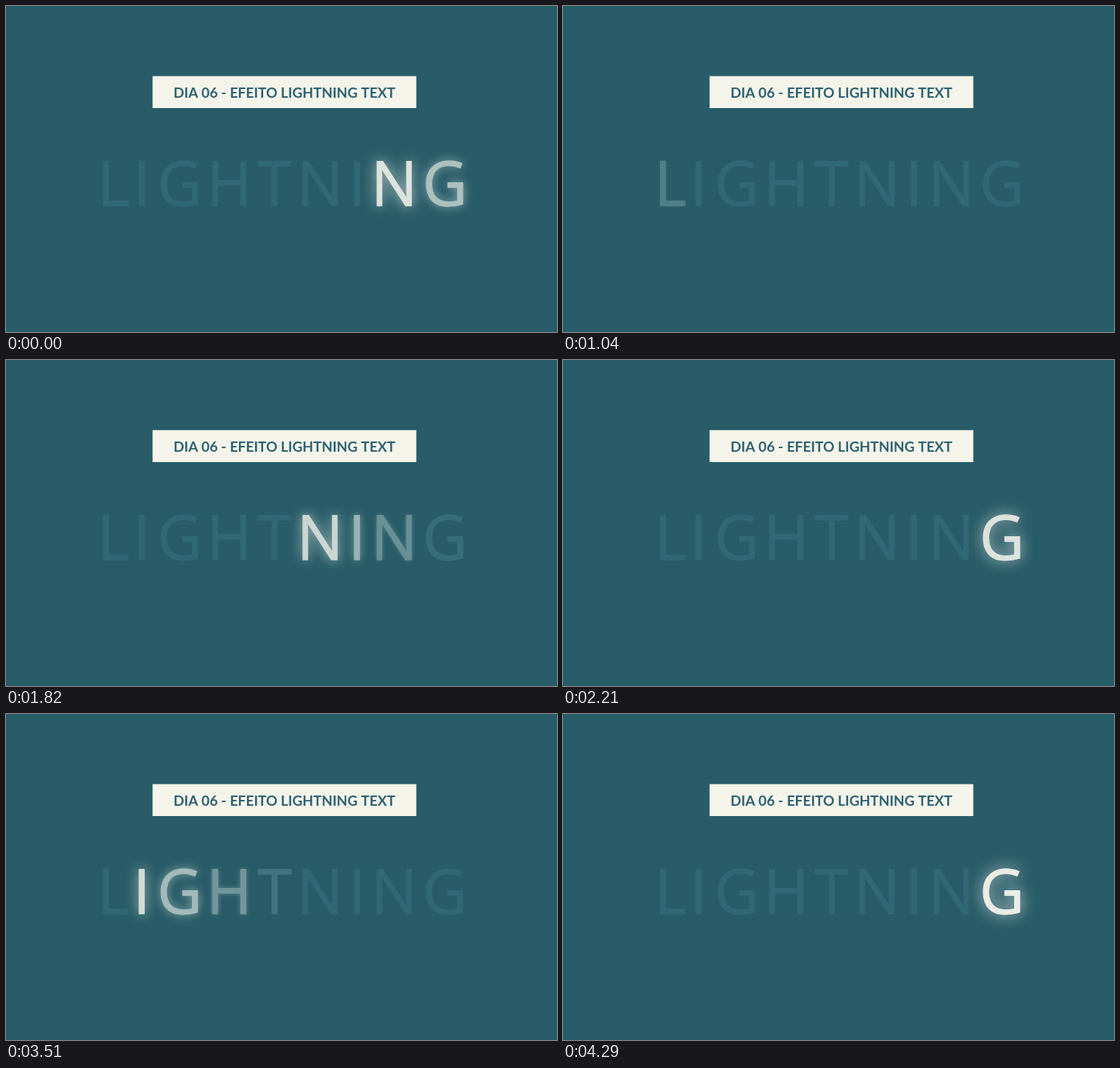
Recreate the animation shown at these times as an HTML page with a canvas. Size 750 by 444 pixels, loop 4420 ms.

```html
<!DOCTYPE html>
<html lang="pt">
<head>
<meta charset="utf-8">
<title>Lightning text</title>
<style>
html, body { margin: 0; width: 100%; height: 100%; overflow: hidden; background: #285c68; }
canvas { display: block; }
</style>
</head>
<body>
<canvas id="stage" width="750" height="444"></canvas>
<script>
const ctx = document.getElementById('stage').getContext('2d');
const LOOP = 4420, STEP = 130;
const CYCLE = 20; // letters' worth of travel between two sweeps
const FADE = 4;   // a letter lights up over this many letters of travel
const DIM = [48, 104, 117], LIT = [244, 244, 235];
const BACK = '#285c68', PAPER = '#f4f4ea', INK = '#2d6170';

const word = 'LIGHTNING';
const centers = [149.5, 185, 236, 304, 365.5, 427.5, 478, 528.5, 597];

// [time in ms, position of the sweep in letters]
const sweep = [[0, 6.5], [1040, 16.65], [1560, 21.9], [2210, 27.5], [3770, 42.9], [4290, 47.8]];

function sweepAt(t) {
  let k = 1;
  while (k < sweep.length - 1 && t > sweep[k][0]) k++;
  const [t0, s0] = sweep[k - 1], [t1, s1] = sweep[k];
  return s0 + (s1 - s0) * (t - t0) / (t1 - t0);
}

// Rises linearly to 1, then drops at once.
function glow(i, s) {
  const ahead = ((i - s) % CYCLE + CYCLE) % CYCLE;
  return Math.max(0, 1 - ahead / FADE);
}

function mix(v) {
  return `rgb(${DIM.map((c, k) => Math.round(c + (LIT[k] - c) * v))})`;
}

function drawTitle() {
  ctx.fillStyle = PAPER;
  ctx.fillRect(199.5, 95.5, 359, 43.5);
  ctx.fillStyle = INK;
  ctx.font = 'bold 19.1px Lato, sans-serif';
  ctx.textAlign = 'center';
  ctx.fillText('DIA 06 - EFEITO LIGHTNING TEXT', 379, 125);
}

function drawLetter(ch, center, v) {
  const m = ctx.measureText(ch);
  const x = center - (m.actualBoundingBoxRight - m.actualBoundingBoxLeft) / 2;
  ctx.fillStyle = ctx.strokeStyle = mix(v);
  ctx.shadowColor = `rgba(${LIT}, ${v})`;
  ctx.shadowBlur = 22 * v;
  ctx.fillText(ch, x, 271.5);
  // A thin round outline softens the corners.
  ctx.shadowColor = 'transparent';
  ctx.strokeText(ch, x, 271.5);
}

function draw(t) {
  ctx.fillStyle = BACK;
  ctx.fillRect(0, 0, 750, 444);
  drawTitle();

  const s = sweepAt(t);
  ctx.save();
  ctx.font = '83.5px "Open Sans", "Noto Sans", sans-serif';
  ctx.textAlign = 'left';
  ctx.lineWidth = 1.3;
  ctx.lineJoin = 'round';
  [...word].forEach((ch, i) => drawLetter(ch, centers[i], glow(i, s)));
  ctx.restore();
}

const start = performance.now();
function tick() {
  const t = (performance.now() - start) % LOOP;
  draw(Math.floor(t / STEP) * STEP);
  requestAnimationFrame(tick);
}
tick();
</script>
</body>
</html>
```
